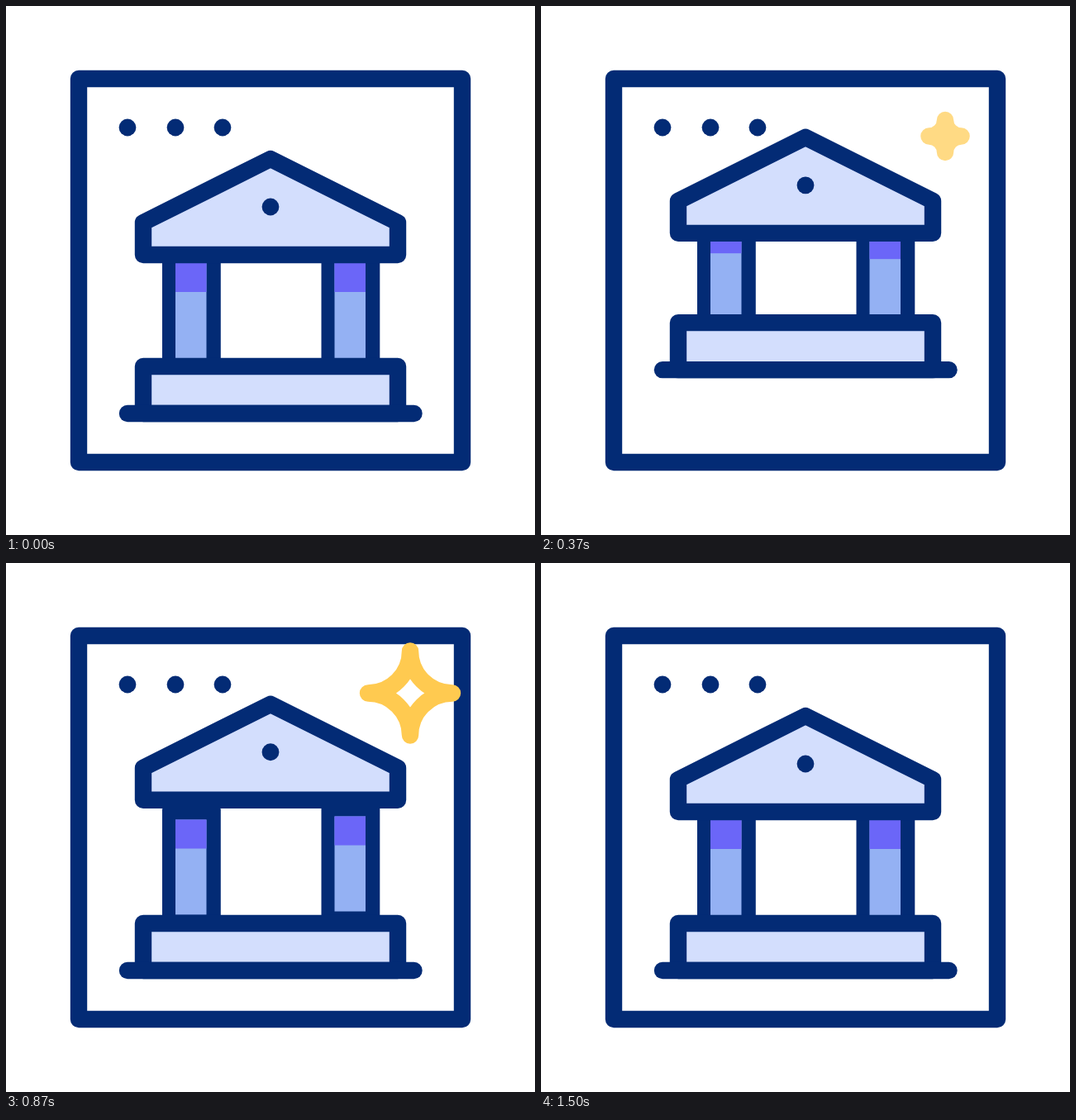
Recreate the animation shown at these times as an HTML page. Size 640x640 px, loop 2 s.

```html
<!DOCTYPE html>
<html lang="en">
<head>
<meta charset="utf-8">
<title>Bank window</title>
<style>
  html, body { margin: 0; height: 100%; overflow: hidden; background: #fff; }
  svg { display: block; width: 100vw; height: 100vh; }
  .line { fill: none; stroke: #032b75; stroke-width: 20.4; stroke-linecap: round; stroke-linejoin: round; }
  .pale { fill: #d3defd; }
  .navy { fill: #032b75; }
  #star { stroke: #ffca50; }
</style>
</head>
<body>
<svg viewBox="0 0 640 640">
  <defs>
    <g id="column">
      <rect class="navy" x="-16" y="291" width="70.8" height="155" rx="8"/>
      <rect x="0" y="311" width="37.5" height="115" fill="#94b1f3"/>
      <rect x="0" y="311" width="37.5" height="35" fill="#6b66f8"/>
    </g>
  </defs>
  <rect class="line" x="88" y="88" width="464" height="464"/>
  <g class="navy">
    <circle cx="147" cy="147" r="10.4"/>
    <circle cx="205" cy="147" r="10.4"/>
    <circle cx="262" cy="147" r="10.4"/>
  </g>
  <g id="left"><use href="#column" x="205"/></g>
  <g id="right"><use href="#column" x="397.5"/></g>
  <g id="base">
    <path class="line pale" d="M166 493V436H474V493Z"/>
    <path class="line" d="M147 493H493.5"/>
  </g>
  <g id="roof">
    <path class="line pale" d="M320 185L474 262V301H166V262Z"/>
    <circle class="navy" cx="320" cy="243" r="10.4"/>
  </g>
  <path id="star" class="line" transform="translate(489 157.5)"/>
</svg>
<script>
  const LOOP = 2000, FPS = 30, LIFT = 57.6, STAR_RADIUS = 51;
  const $ = id => document.getElementById(id);

  // All times below are in ticks of 1/30 s.
  const parts = [
    { el: $("base"),  rise: 0.3, fall: 14.1 },
    { el: $("left"),  rise: 1.6, fall: 15.5 },
    { el: $("right"), rise: 2.8, fall: 16.8 },
    { el: $("roof"),  rise: 4.9, fall: 18.5 },
  ];
  const star = $("star");

  const ramp = (t, from, to) => Math.min(1, Math.max(0, (t - from) / (to - from)));
  const ease = (t, from, to) => {
    const x = ramp(t, from, to);
    return x * x * (3 - 2 * x);
  };

  function drawStar(tick) {
    const grow = 1.25 * ease(tick, 7.5, 17) - 0.25 * ease(tick, 17, 24);
    const r = STAR_RADIUS * grow * (1 - ease(tick, 34.8, 45));
    star.setAttribute("d", `M0 ${-r}A${r} ${r} 0 0 0 ${r} 0A${r} ${r} 0 0 0 0 ${r}` +
      `A${r} ${r} 0 0 0 ${-r} 0A${r} ${r} 0 0 0 0 ${-r}Z`);
    star.setAttribute("opacity", ramp(tick, 7.5, 12.5) * (1 - ramp(tick, 40, 45)));
  }

  function draw(now) {
    const tick = Math.floor((now % LOOP + 4) * FPS / 1000);
    for (const { el, rise, fall } of parts) {
      const lift = LIFT * (ease(tick, rise, rise + 13) - ease(tick, fall, fall + 11.1));
      el.setAttribute("transform", `translate(0 ${-lift})`);
    }
    drawStar(tick);
  }

  const start = performance.now();
  (function loop() {
    draw(performance.now() - start);
    requestAnimationFrame(loop);
  })();
</script>
</body>
</html>
```
